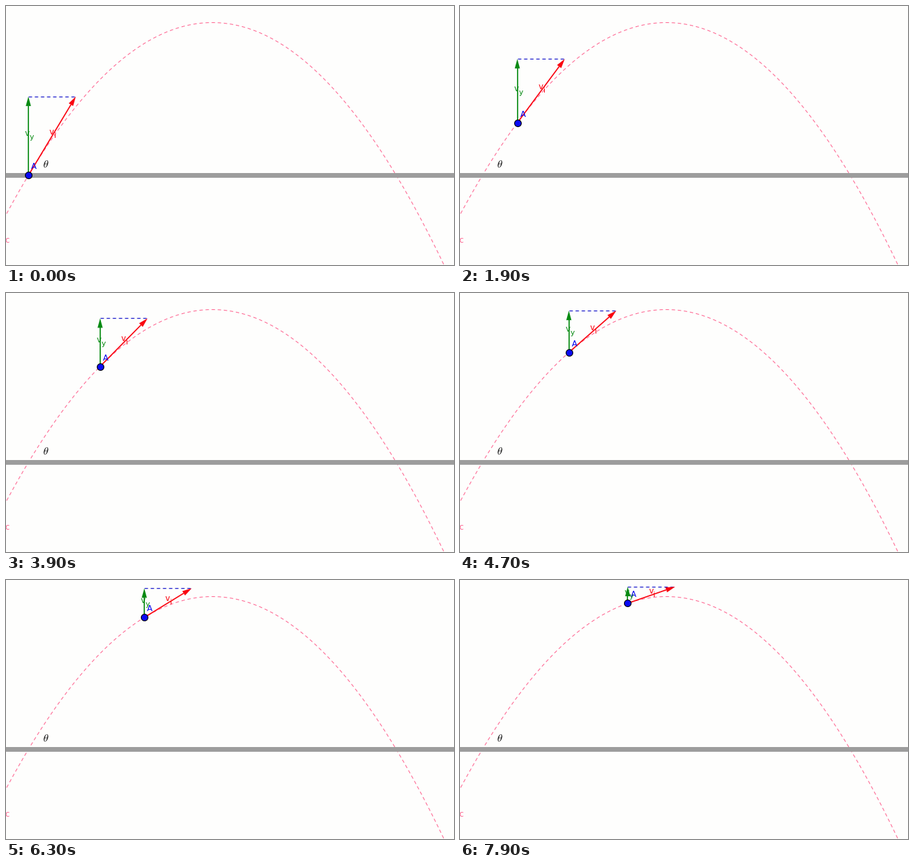
A matplotlib script for the animation above (8 s loop, 661 by 383 pixels).

```python
import numpy as np
import matplotlib.pyplot as plt
from matplotlib.animation import FuncAnimation

W, H, DPI = 661, 383, 64
PT = 72 / DPI                     # points per pixel
FRAMES, INTERVAL = 80, 100

START_X, STEP = 33, 2.715
APEX_X, APEX_Y, CURVE = 304.4, 24.5, 0.003068
RUN = 70                          # constant horizontal velocity
HEAD, HALF = 14, 3.8              # arrowhead length and half width

PAPER, GROUND, PINK = "#fefefd", "#9d9d9d", "#ff6a94"
RED, GREEN, BLUE, DASH_BLUE = "#fa0410", "#078a12", "#0a0af0", "#1e1ecc"

plt.rcParams.update({
    "font.family": "DejaVu Sans",
    "mathtext.fontset": "cm",
    "lines.scale_dashes": False,
    "toolbar": "None",
})

fig = plt.figure(figsize=(W / DPI, H / DPI), dpi=DPI, facecolor=PAPER)
ax = fig.add_axes([0, 0, 1, 1])
ax.set_xlim(0, W)
ax.set_ylim(H, 0)
ax.axis("off")


def path_y(x):
    return APEX_Y + CURVE * (x - APEX_X) ** 2


def stroke(xs, ys, color, width, z, dashed=False):
    line, = ax.plot(xs, ys, color=color, lw=width * PT, zorder=z,
                    solid_capstyle="butt")
    if dashed:
        line.set_dashes([5 * PT, 4 * PT])
    return line


def label(x, y, text, color, size=12):
    return ax.text(x, y, text, color=color, fontsize=size * PT,
                   ha="left", va="baseline", zorder=8)


class Arrow:
    def __init__(self, color, z):
        self.shaft = stroke([], [], color, 1.7, z)
        self.head = ax.fill([0, 0, 0], [0, 0, 0], color=color, lw=0, zorder=z)[0]

    def place(self, tail, tip):
        tail, tip = np.array(tail), np.array(tip)
        unit = (tip - tail) / np.hypot(*(tip - tail))
        side = HALF * np.array([-unit[1], unit[0]])
        base = tip - HEAD * unit
        self.shaft.set_data(*zip(tail, base))
        self.head.set_xy([tip, base + side, base - side])


class VectorLabel:
    """The letter v with a lowered index."""

    def __init__(self, index, color):
        self.letter = label(0, 0, "v", color)
        self.index = label(0, 0, index, color, 11)

    def place(self, x, y):
        self.letter.set_position((x, y))
        self.index.set_position((x + 7, y + 5))


xs = np.linspace(1, 660, 700)
stroke(xs, path_y(xs), PINK, 1.1, 1, dashed=True)
ax.fill_between([0, W], 247, 254, color=GROUND, lw=0, zorder=2)
label(-2, 350, "c", PINK)
label(54.5, 239, r"$\theta$", "#111111", 16)

top_dash = stroke([], [], DASH_BLUE, 1.3, 3, dashed=True)
rise = Arrow(GREEN, 4)
velocity = Arrow(RED, 5)
ball, = ax.plot([], [], "o", ms=10 * PT, mfc="#0a0af5", mec="black",
                mew=1.1 * PT, zorder=6)
name = label(0, 0, "A", BLUE)
rise_label = VectorLabel("y", GREEN)
velocity_label = VectorLabel("i", RED)


def draw(i):
    x = START_X + STEP * i
    y = path_y(x)
    top = y + RUN * 2 * CURVE * (x - APEX_X)
    mid = (y + top) / 2

    top_dash.set_data([x, x + RUN], [top, top])
    rise.place((x, y), (x, top))
    velocity.place((x, y), (x + RUN, top))
    ball.set_data([x], [y])
    name.set_position((x + 4, y - 9))
    rise_label.place(x - 5, mid)
    velocity_label.place(x + RUN / 2 - 4, mid - 2.5)
    return []


anim = FuncAnimation(fig, draw, frames=FRAMES, interval=INTERVAL,
                     repeat=True, repeat_delay=0, blit=False)
plt.show()
```
